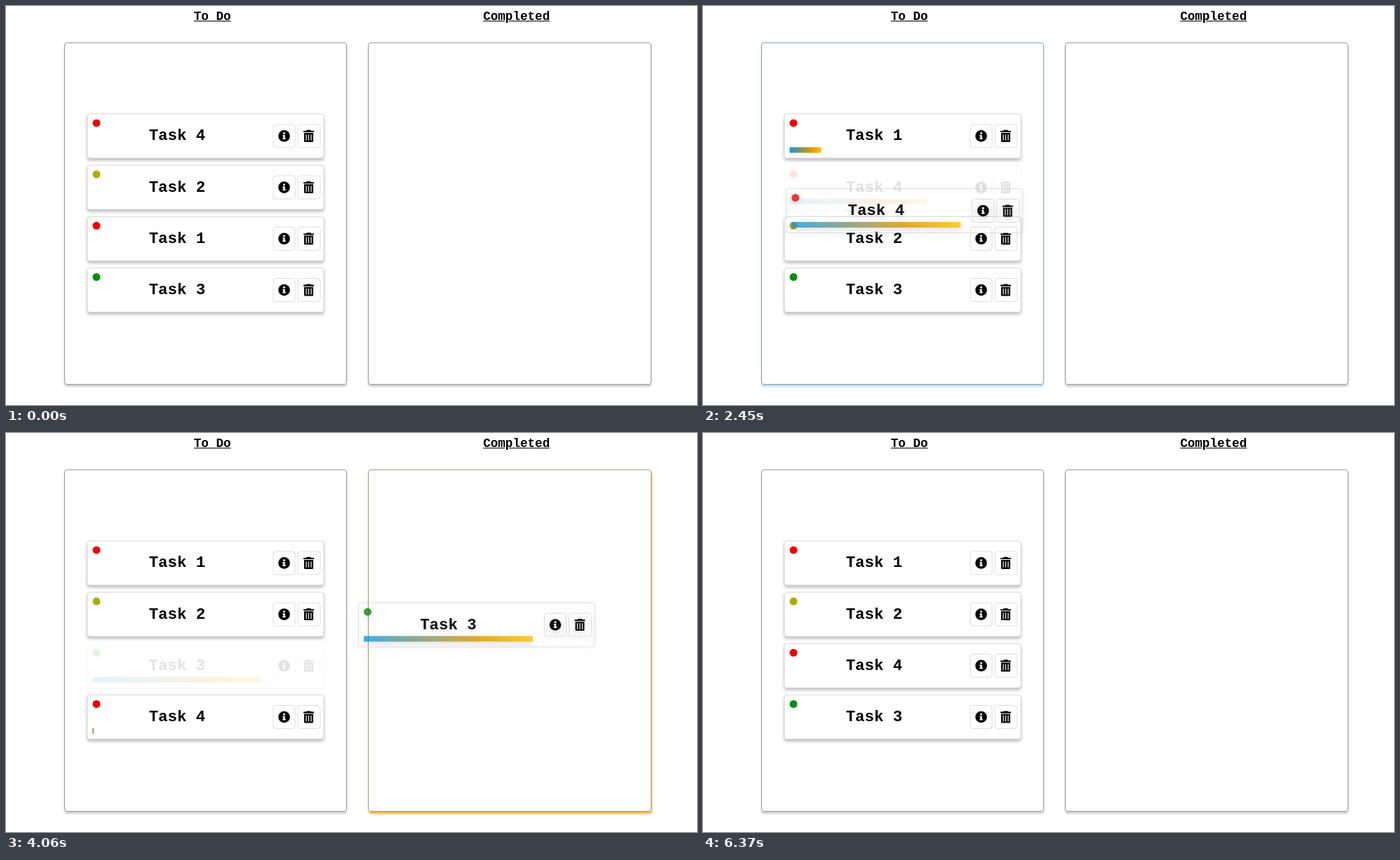
These frames come from a looping animation (985 by 569 pixels, 7.28 s). An HTML page:

```html
<!DOCTYPE html>
<html lang="en">
<head>
<meta charset="utf-8">
<title>Task board</title>
<style>
html, body { margin: 0; width: 100%; height: 100%; overflow: hidden; background: #fff; }
body { position: relative; color: #000; font-family: "Courier New", "Liberation Mono", monospace; font-weight: bold; }
div, svg { position: absolute; box-sizing: border-box; }
.title { top: 5px; width: 200px; text-align: center; font-size: 17.6px; line-height: 20px; text-decoration: underline; }
.column { top: 51.5px; width: 403.5px; height: 488px; border: 1px solid #999; border-radius: 4px; box-shadow: 0 3px 3px rgba(0,0,0,.2); }
.column.blue { border-color: #8a9fa8; box-shadow: 0 3px 3px rgba(70,170,215,.4); }
.column.orange { border-color: #a8987f; box-shadow: 1px 3px 3px rgba(255,160,20,.85); }
.card { left: 0; top: 0; width: 338px; height: 64px; background: #fff; border: 1px solid #d8d8d8; border-radius: 4px; box-shadow: 0 3px 4px rgba(0,0,0,.25); }
.card > * { margin: -1px 0 0 -1px; }
.dot { left: 8px; top: 8px; width: 11px; height: 11px; border-radius: 50%; }
.name { left: 28.5px; top: 18.5px; width: 200px; text-align: center; font-size: 22.4px; line-height: 26px; white-space: pre; }
.button { top: 15px; width: 32.5px; height: 34px; border: 1px solid #ddd; border-radius: 4px; }
.button svg { left: 5.2px; top: 6px; width: 20px; height: 20px; }
.bar { left: 8px; top: 48px; height: 7.5px; background: linear-gradient(90deg, #1199dd, #dd9400 67%, #ffc000); }
.drag { background: none; border-color: rgba(205,205,205,.65); box-shadow: none; filter: drop-shadow(0 3px 4px rgba(0,0,0,.17)); }
.drag .dot, .drag .bar { opacity: .78; }
.drag .name, .drag svg { opacity: .93; }
</style>
</head>
<body>
<script>
const LOOP = 7280, FRAME = 70, TICK = 5;
const TASKS = [1, 2, 3, 4], COLORS = { 1: '#f40000', 2: '#adad05', 3: '#048f0b', 4: '#f40000' };
const LEFT = 115.5, TOP = 153.4, PITCH = 73.2, COLUMN_GAP = 433.5, ROWS = 4;
const CARD_WIDTH = 338, BAR = 241, GROW = 500;
const SETTLE = 60, PASS = 70, GRAB_Y = 25;
const GLOW = ['blue', 'orange'];

// The card slides from its slot towards (x, y) and is let go at drop.
const DRAGS = [
  { task: 1, start: 980, duration: 700, drop: 1535, x: 117, y: 229 },
  { task: 4, start: 2260, duration: 780, drop: 3090, x: 122, y: 402.5 },
  { task: 3, start: 3850, duration: 210, drop: 4065, x: 502, y: 241.5 },
  { task: 3, start: 4970, duration: 1050, drop: 5815, x: 149, y: 115.5 }
];

// Rows of the first column the pointer passes, PASS ms apart; -1 is off the cards.
const SWEEPS = [
  { start: 200, rows: [0, 1, 2] },
  { start: 1750, rows: [0] },
  { start: 3615, rows: [2] },
  { start: 6060, rows: [0, 1, 2, -1] }
];

const INFO = '<svg viewBox="-10 -10 20 20"><circle r="8.3"/><g fill="#fff"><circle cy="-3.8" r="1.5"/>' +
  '<path d="M-2.2-1.3H1.2V2.8H2.2V4.5H-2.2V2.8H-1.2V.4H-2.2Z"/></g></svg>';
const TRASH = '<svg viewBox="-10 -10 20 20"><path fill-rule="evenodd" d="M-7.4-7.4H-3.6L-2.7-8.6H2.7L3.6-7.4H7.4V-5.3H-7.4Z' +
  'M-6.5-4.3H6.5V7Q6.5 8.5 5 8.5H-5Q-6.5 8.5-6.5 7Z' +
  [-3.5, 0, 3.5].map(x => `M${x - .6}-2.2h1.2v8.6h-1.2Z`).join('') + '"/></svg>';

const clamp = (v, lo, hi) => Math.min(hi, Math.max(lo, v));
const easeOut = p => 1 - (1 - clamp(p, 0, 1)) ** 2;
const topOf = list => TOP + (ROWS - list.length) / 2 * PITCH;

// CSS "ease": cubic-bezier(.25, .1, .25, 1)
function ease(x) {
  const bezier = (a, b, s) => 3 * a * s * (1 - s) ** 2 + 3 * b * s * s * (1 - s) + s ** 3;
  let lo = 0, hi = 1;
  for (let i = 0; i < 20; i++) {
    const mid = (lo + hi) / 2;
    if (bezier(.25, .25, mid) < x) lo = mid; else hi = mid;
  }
  return bezier(.1, 1, hi);
}

function barAt({ start, from, to }, t) {
  const span = Math.abs(to - from);
  return span ? from + (to - from) * ease(clamp((t - start) / (GROW * span), 0, 1)) : to;
}

function locate(lists, task) {
  const col = lists.findIndex(list => list.includes(task));
  const row = lists[col].indexOf(task);
  return { col, row, x: LEFT + col * COLUMN_GAP, y: topOf(lists[col]) + row * PITCH };
}

function move(lists, task, col, row) {
  const { col: oldCol, row: oldRow } = locate(lists, task);
  lists[oldCol].splice(oldRow, 1);
  lists[col].splice(row, 0, task);
}

function columnUnder(x) {
  const middle = x + CARD_WIDTH / 2;
  return middle < 486 ? 0 : middle > 516 ? 1 : -1;
}

// Plays the whole loop once and keeps a snapshot for every shown frame.
function simulate() {
  const lists = [[4, 2, 1, 3], []];
  const bars = {};
  for (const task of TASKS) bars[task] = { start: 0, from: 0, to: 0 };
  let pointer = { col: 0, row: -1 }, drag = null;
  const frames = [];

  for (let t = 0; t < LOOP; t += TICK) {
    for (const { start, rows } of SWEEPS) {
      const i = (t - start) / PASS;
      if (i in rows) pointer = { col: 0, row: rows[i] };
    }

    const begun = DRAGS.find(d => d.start === t);
    if (begun) drag = { ...begun, home: locate(lists, begun.task) };
    let image = null, over = -1;
    if (drag) {
      const { task, home } = drag;
      const p = easeOut((t - drag.start) / drag.duration);
      const x = home.x + (drag.x - home.x) * p, y = home.y + (drag.y - home.y) * p;
      over = columnUnder(x);
      // Neighbours give way once most of a slot has been crossed.
      const steps = Math.trunc((y - home.y) / PITCH * 1.1);
      move(lists, task, home.col, clamp(home.row + steps, 0, lists[home.col].length - 1));
      if (t < drag.drop) image = { task, x, y };
      if (t >= drag.drop + SETTLE) {
        if (over !== home.col) {
          move(lists, task, over, lists[over].length);
          bars[task] = { start: t, from: 0, to: 0 };
        }
        pointer = { col: over, row: Math.floor((y + GRAB_Y - topOf(lists[over])) / PITCH) };
        drag = null;
        over = -1;
      }
    }

    const hovered = lists[pointer.col][pointer.row];
    for (const task of TASKS) {
      const to = task === hovered ? 1 : 0;
      if (bars[task].to !== to) bars[task] = { start: t, from: barAt(bars[task], t), to };
    }

    if (t % FRAME === 0) {
      const cards = TASKS.map(task => ({
        task, ...locate(lists, task),
        bar: barAt(bars[task], t),
        ghost: drag !== null && drag.task === task
      }));
      frames.push({ cards, image, over });
    }
  }
  return frames;
}

function add(parent, className, html = '') {
  const el = document.createElement('div');
  el.className = className;
  el.innerHTML = html;
  return parent.appendChild(el);
}

function makeCard(className) {
  const el = add(document.body, className);
  const dot = add(el, 'dot'), name = add(el, 'name');
  add(el, 'button', INFO).style.left = '264.8px';
  add(el, 'button', TRASH).style.left = '300px';
  return { el, dot, name, bar: add(el, 'bar') };
}

function setTask(card, task) {
  card.name.textContent = 'Task ' + task;
  card.dot.style.background = COLORS[task];
}

function place(card, x, y, bar) {
  card.el.style.transform = `translate(${x}px, ${y}px)`;
  card.bar.style.width = BAR * bar + 'px';
}

const columns = ['To Do', 'Completed'].map((text, i) => {
  add(document.body, 'title', text).style.left = 194.2 + i * COLUMN_GAP + 'px';
  const column = add(document.body, 'column');
  column.style.left = 82.5 + i * COLUMN_GAP + 'px';
  return column;
});
const cardOf = {};
for (const task of TASKS) setTask(cardOf[task] = makeCard('card'), task);
const dragCard = makeCard('card drag');
const frames = simulate();

function render({ cards, image, over }) {
  for (const { task, x, y, bar, ghost } of cards) {
    place(cardOf[task], x, y, bar);
    cardOf[task].el.style.opacity = ghost ? .11 : 1;
  }
  columns.forEach((el, col) => el.className = col === over ? 'column ' + GLOW[col] : 'column');
  dragCard.el.style.display = image ? '' : 'none';
  if (image) {
    setTask(dragCard, image.task);
    place(dragCard, image.x, image.y, 1);
  }
}

const start = performance.now();
function tick() {
  const t = (performance.now() - start) % LOOP;
  render(frames[Math.floor(t / FRAME)]);
  requestAnimationFrame(tick);
}
tick();
</script>
</body>
</html>
```
